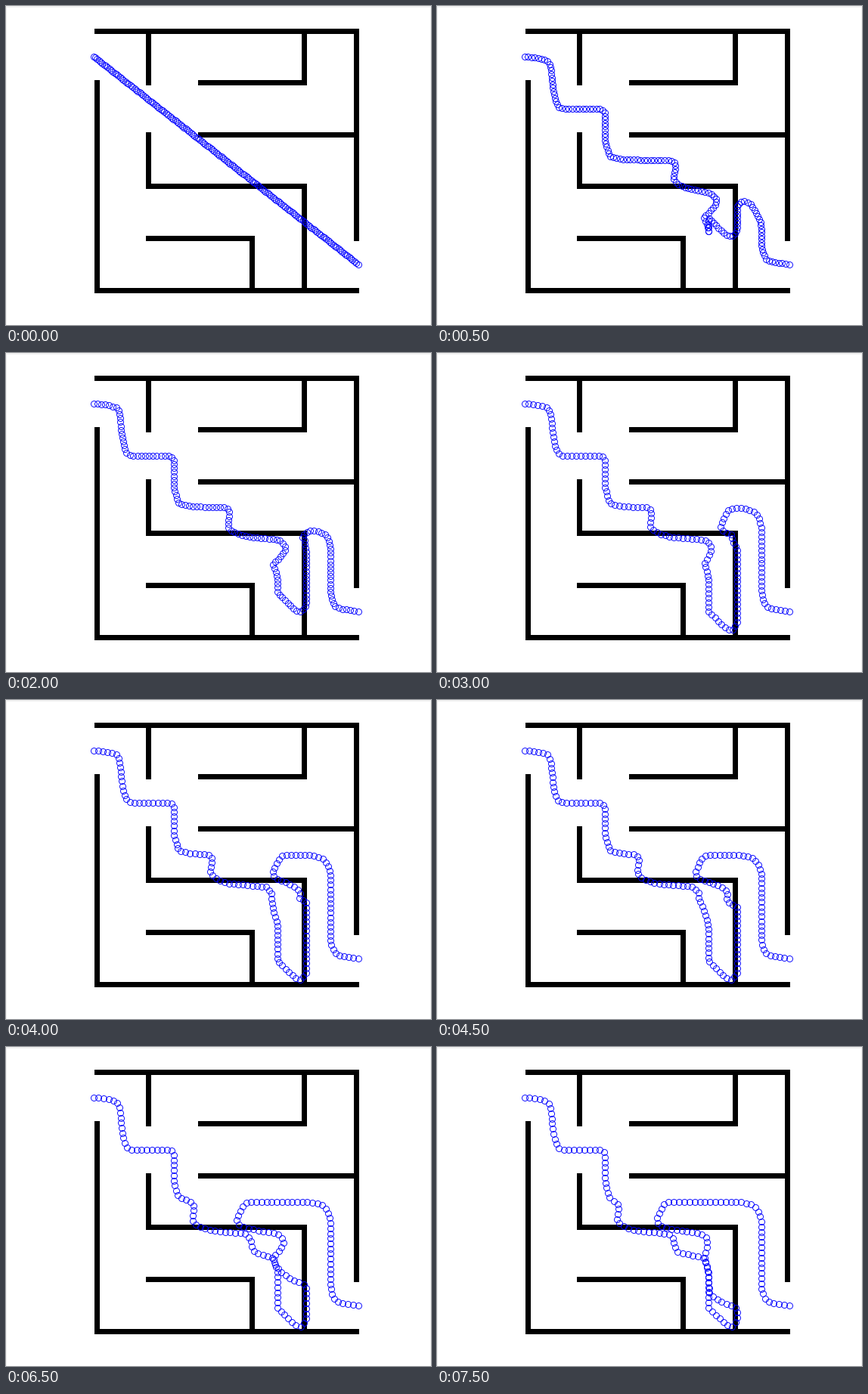
A matplotlib script that plays this animation: 562 by 422 pixels, repeating every 8 s.

```python
import numpy as np
import matplotlib.pyplot as plt
from matplotlib.animation import FuncAnimation

W, H, DPI = 562, 422, 64
PX = 72 / DPI
BEADS, FRAMES, INTERVAL = 150, 16, 500
START, END = (115.5, 66.5), (465.5, 341.5)

# wall segments on a 5 x 5 grid: column, row -> column, row
WALLS = [(0, 0, 5, 0), (5, 0, 5, 4), (0, 1, 0, 5), (0, 5, 5, 5),
         (1, 0, 1, 1), (4, 0, 4, 1), (2, 1, 4, 1), (2, 2, 5, 2),
         (1, 2, 1, 3), (1, 3, 4, 3), (4, 3, 4, 5), (1, 4, 3, 4),
         (3, 4, 3, 5)]

# rails that the string settles on
LEFT, MID, RIGHT = 359, 397, 428.5

HEAD = [START, (135, 69), (146, 72), (150, 79), (153, 107), (156, 124),
        (160, 133), (167, 136), (218, 136), (222, 141), (222, 178), (228, 199)]
TAIL = [(RIGHT, 315), (431, 327), (435, 335), (443, 338.5), END]
OPENING = [(MID, 262), (401, 254), (407, 256), (426, 270), (RIGHT, 280)]


def drop(a):
    """From the upper corridor down through the wall below it."""
    return [(min(244, a - 8), 203), (a - 5, 204.5), (a, 208), (a, 216),
            (a - 2, 229), (a + 3, 235), (a + 14, 240), (a + 24, 243)]


def strand(b):
    """Off the lower side of the wall at x = b and down to the left rail."""
    knee = min(b + 4, (b + 354) / 2)
    return [(b - 8, 247), (b, 254), (b, 262), (knee, 271),
            (353, 279), (357, 290), (LEFT, 300)]


def bottom(d):
    return [(LEFT, d - 25), (371, d - 13), (383, d - 2), (390, d), (MID, d - 9)]


def climb(e, r):
    """Leave the right rail at height r, then go up along a strand at x = e."""
    x0 = max(LEFT + 1, e - 2)
    w = MID - x0
    h = 0.54 * w
    link = [(MID, r), (MID - 0.1 * w, r - 0.2 * h),
            (MID - 0.47 * w, r - 0.4 * h), (x0, r - h)]
    return link + [p for p in strand(e) if p[1] < r - h - 5][::-1]


def loop(c):
    """Back through the wall, then along the upper corridor to the right."""
    return [(c + 15, 240), (c + 4, 236), (c, 229), (c + 6, 215), (c + 11, 207),
            (c + 17, 205), (402, 205), (418, 209), (425, 217), (RIGHT, 229)]


def spread(points, n):
    """n points at equal distances along a polyline."""
    p = np.array(points, float)
    dist = np.r_[0, np.cumsum(np.hypot(*np.diff(p, axis=0).T))]
    s = np.linspace(0, dist[-1], n)
    return np.column_stack([np.interp(s, dist, p[:, k]) for k in (0, 1)])


def path_at(t):
    if t == 0:
        return [START, END]
    a = 308 - 6 * (t - 2) + 0.11 * (t - 2) * (t - 8)
    b = min(369, 362 - 5.4 * (t - 6))
    d = min(370, 293 + 12.3 * t)

    # the right-hand loop opens first, then travels left
    u = min(1, (t - 2) / 4)
    v = max(0, t - 6)
    c = 375 - 12.1 * v + 0.294 * v ** 2
    e = 398 - 4.5 * v
    r = 258 + 3 * v + 0.77 * v ** 2
    right = (1 - u) * spread(OPENING, 80) + u * spread(climb(e, r) + loop(c), 80)

    return HEAD + drop(a) + strand(b) + bottom(d) + right.tolist() + TAIL


fig = plt.figure(figsize=(W / DPI, H / DPI), dpi=DPI, facecolor="white")
ax = fig.add_axes([0, 0, 1, 1])
ax.set_xlim(0, W)
ax.set_ylim(H, 0)
ax.axis("off")

for x, y, w, h in [(0, 0, W, 2), (0, 0, 1, H), (W - 1, 0, 1, H)]:
    ax.add_patch(plt.Rectangle((x, y), w, h, color="#f0f0f0", lw=0))

for c0, r0, c1, r1 in WALLS:
    xs = 119.5 + 68.6 * np.array([c0, c1])
    ys = 32.5 + 68.6 * np.array([r0, r1])
    ax.plot(xs, ys, color="black", lw=7 * PX, solid_capstyle="projecting")

beads, = ax.plot([], [], "o", ms=8 * PX, mfc="none", mec="#0000ff", mew=0.9 * PX)


def update(i):
    beads.set_data(*spread(path_at(i), BEADS).T)
    return beads,


anim = FuncAnimation(fig, update, frames=FRAMES, interval=INTERVAL,
                     repeat=True, repeat_delay=0)
plt.show()
```
